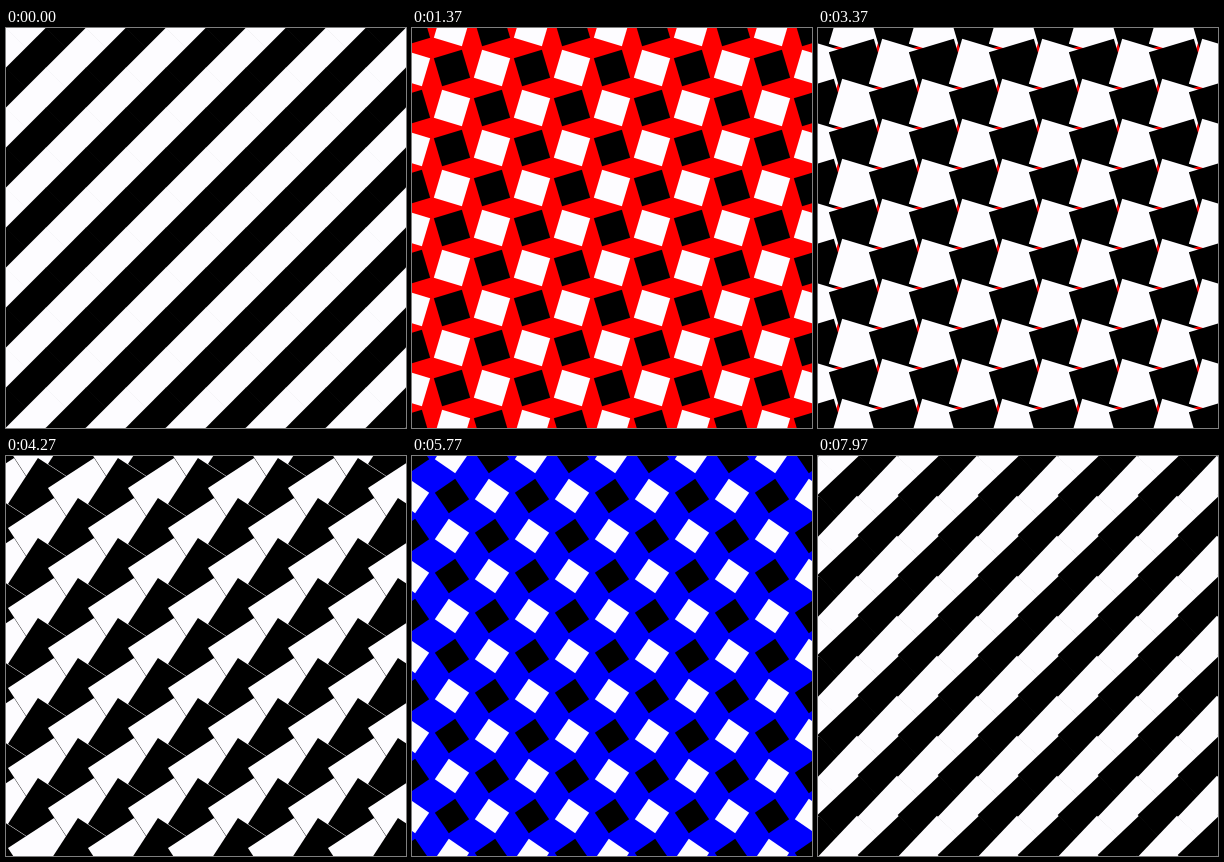
An HTML page with a canvas for the animation above (8.01 s loop, 400 by 400 pixels).

```html
<!DOCTYPE html>
<html lang="en">
<head>
<meta charset="utf-8">
<title>Turning squares</title>
<style>
  html, body { margin: 0; width: 100%; height: 100%; overflow: hidden; background: #000; }
  canvas { display: block; width: 400px; height: 400px; }
</style>
</head>
<body>
<canvas id="stage" width="400" height="400"></canvas>
<script>
const ctx = document.getElementById('stage').getContext('2d');
const LOOP = 8010;
const STEPS = 240;
const CELL = 40;
const BIG = 57.1;   // side at which the squares close into stripes
const SMALL = 24;
const WHITE = '#fdfcff';

function square(x, y, side, angle, color) {
  ctx.save();
  ctx.translate(x, y);
  ctx.rotate(angle);
  ctx.fillStyle = color;
  ctx.fillRect(-side / 2, -side / 2, side, side);
  ctx.restore();
}

function draw(step) {
  const turn = step / STEPS * Math.PI * 2;
  // two pulses per turn, scaled geometrically between the extremes
  const pulse = (1 - Math.cos(turn * 2)) / 2;
  const side = BIG * Math.pow(SMALL / BIG, pulse);
  const angle = turn - Math.PI / 4;

  ctx.fillStyle = step < STEPS / 2 ? '#f00' : '#00f';
  ctx.fillRect(0, 0, 400, 400);

  // row by row, each square covers the ones above and to its left
  for (let j = -1; j <= 11; j++) {
    for (let i = -1; i <= 11; i++) {
      const dark = (i + j) % 2 === 0;
      square(i * CELL, j * CELL, side, dark ? -angle : angle, dark ? '#000' : WHITE);
    }
  }
}

const start = performance.now();

function tick(now) {
  const t = Math.max(0, now - start) % LOOP;
  draw(Math.min(STEPS - 1, Math.floor((t + 3.5) * 0.03)));
  requestAnimationFrame(tick);
}

draw(0);
requestAnimationFrame(tick);
</script>
</body>
</html>
```
